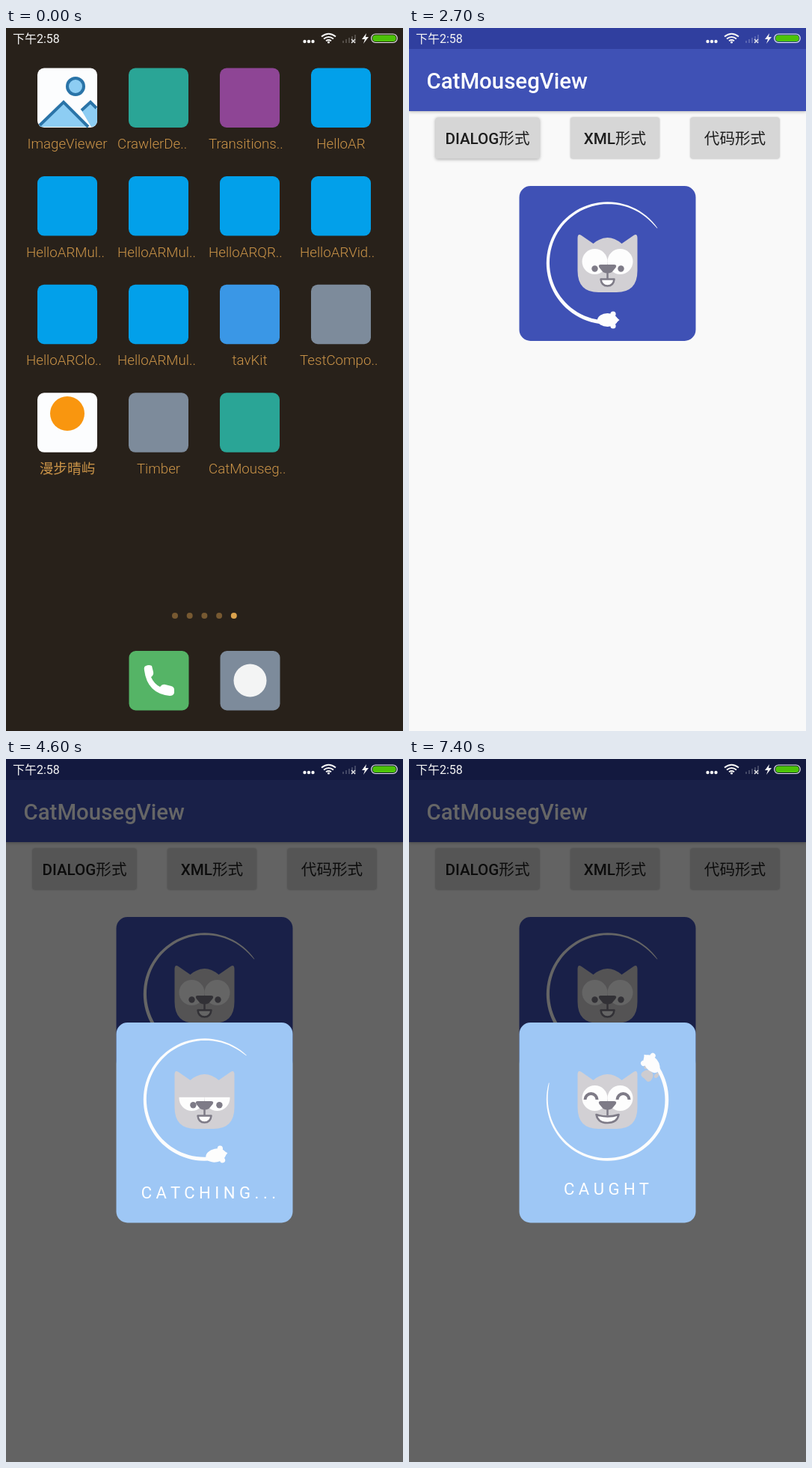
Animation of 531x939 px, one loop 8 s. Source, as an HTML page:

```html
<!DOCTYPE html>
<html lang="zh">
<head>
<meta charset="utf-8">
<title>CatMousegView</title>
<style>
  html, body { margin: 0; width: 100%; height: 100%; overflow: hidden; background: #28211a; }
  svg { display: block; width: 531px; height: 939px; }
  text { font-family: Roboto, "Noto Sans CJK SC", "Noto Sans CJK", sans-serif; white-space: pre; }
  .label { font-size: 18.7px; font-weight: 300; fill: #cb9448; text-anchor: middle; }
  .label.cut { text-anchor: start; }
  .button text { font-size: 20.6px; font-weight: 500; fill: #1d1d1d; text-anchor: middle; }
  .button .han { font-weight: 400; }
  .button rect { fill: #d6d6d6; filter: drop-shadow(0 .5px 1px #0004); }
  .button.pressed rect { filter: drop-shadow(0 1.5px 2px #0005); }
  .bar { filter: drop-shadow(0 1.5px 2px #0004); }
  .words { font-size: 22.1px; fill: #fff; }
</style>
</head>
<body>
<svg viewBox="0 0 531 939">
  <rect width="531" height="939" fill="#28211a"/>
  <g id="home"></g>
  <g id="app">
    <rect width="531" height="939" fill="#f9f9f9"/>
    <g id="content">
      <rect class="bar" y="28" width="531" height="83" fill="#3f51b5"/>
      <rect width="531" height="28" fill="#303f9f"/>
      <text x="23.5" y="81" font-size="29.4" font-weight="500" fill="#fff">CatMousegView</text>
      <g id="buttons"></g>
      <rect x="147.5" y="211" width="236" height="207" rx="15" fill="#3f51b5"/>
      <g id="idleCat" transform="translate(265.5 314)"></g>
    </g>
  </g>
  <rect id="dim" width="531" height="939"/>
  <g id="dialog">
    <rect x="147.5" y="352" width="236" height="267.5" rx="15" fill="#9ec7f5"/>
    <g id="chaseCat" transform="translate(265.5 455)"></g>
    <text id="typing" class="words" x="180.7" y="587"></text>
    <text id="caught" class="words" x="264" text-anchor="middle">C A U G H T</text>
  </g>
  <g id="status" fill="#f4f4f4">
    <text x="9" y="20" font-size="16">下午2:58</text>
    <circle cx="399.5" cy="18" r="2.2"/><circle cx="405" cy="18" r="2.2"/><circle cx="410.5" cy="18" r="2.2"/>
    <g fill="none" stroke="#f4f4f4" stroke-width="2">
      <path d="M422 11.500q9.500-7.500 19 0M425 14.500q6.500-5 13 0M428 17.300q3.500-2.500 7 0"/>
    </g>
    <circle cx="431.500" cy="19" r="1.600"/>
    <path d="M451 20v-3M455 20v-5M459 20v-7M463 20v-9M467 20v-11" stroke="#fff" stroke-opacity=".2" stroke-width="2"/>
    <path d="M462 15l5 5m0-5l-5 5" stroke="#eee" stroke-width="1.200"/>
    <path d="M482 7l-6 8h4l-2 6 7-9h-4z"/>
    <rect x="488.700" y="8" width="34.500" height="11.500" rx="5.500" fill="none" stroke="#eee" stroke-width="1.200"/>
    <rect x="490.300" y="9.600" width="31.300" height="8.300" rx="4" fill="#4cc308"/>
  </g>
</svg>
<script>
const LOOP = 8000, STEP = 100, TAIL = 235;
const CHASE_START = 2830, LAP = 1830, CAUGHT = 7200;
const $ = id => document.getElementById(id);

// Linear interpolation through [time, value] pairs.
function track(points, t) {
  if (t <= points[0][0]) return points[0][1];
  for (let i = 1; i < points.length; i++) {
    const [t0, v0] = points[i - 1], [t1, v1] = points[i];
    if (t <= t1) return v0 + (v1 - v0) * (t - t0) / (t1 - t0);
  }
  return points[points.length - 1][1];
}

const motion = {
  zoom: [[600, .12], [700, .4], [800, .7], [900, .89], [1000, .957], [1100, .985], [1300, 1]],
  window: [[500, 0], [600, .3], [700, .8], [800, 1]],
  content: [[900, 0], [1000, .2], [1100, .6], [1200, .92], [1300, 1]],
  home: [[500, 0], [1000, 1]],
  dim: [[2700, 0], [2800, .09], [2900, .32], [3000, .5], [3100, .6]],
  dialog: [[2700, 0], [2800, .4], [2900, 1]],
  angle: [[2850, 270], [2900, 279], [3600, 444], [5600, 839], [7100, 1119]],
  paw: [[5400, 0], [5500, 1], [5600, .9], [5800, 0], [6900, 0], [7000, 1]],
  caught: [[7100, 0], [7200, .45], [7300, .8], [7400, 1]]
};

function buildHome() {
  const blue = '#02a0ea', teal = '#2aa596', slate = '#7d8b9b';
  const apps = [
    ['ImageViewer', '#fcfdfe'], ['CrawlerDe..', teal], ['Transitions..', '#8e4595'], ['HelloAR', blue],
    ['HelloARMul..', blue], ['HelloARMul..', blue], ['HelloARQR..', blue], ['HelloARVid..', blue],
    ['HelloARClo..', blue], ['HelloARMul..', blue], ['tavKit', '#3a97e6'], ['TestCompo..', slate],
    ['漫步晴屿', '#fcfdfe'], ['Timber', slate], ['CatMouseg..', teal]
  ];
  const tile = (x, y, fill) => `<rect x="${x}" y="${y}" width="80" height="79.500" rx="9" fill="${fill}"/>`;
  let out = apps.map(([name, fill], i) => {
    const x = 42 + i % 4 * 122, y = 53.5 + Math.floor(i / 4) * 144.6;
    const cut = name.endsWith('..');
    return tile(x, y, fill) +
      `<text class="label${cut ? ' cut' : ''}" x="${cut ? x - 15 : x + 40}" y="${y + 107.5}">${name}</text>`;
  }).join('');
  out += `<circle cx="93" cy="78" r="11" fill="#8dcdf3" stroke="#2a74a8" stroke-width="4"/>
    <path d="M45 132L77 99l32 33zM101 110l12-11 9 9v16q-1 8-8 8z" fill="#8dcdf3"/>
    <path d="M45 130L77 99l33 33M101 110l12-11 8 8" fill="none" stroke="#2a74a8" stroke-width="4"/>
    <circle cx="82" cy="515" r="23" fill="#f9960f"/>`;
  for (let i = 0; i < 5; i++)
    out += `<circle cx="${226 + i * 19.7}" cy="785" r="4" fill="${i < 4 ? '#775931' : '#dba34d'}"/>`;
  out += tile(164.5, 832, '#55b466') + tile(286.5, 832, slate) +
    `<path d="M187 852q4-2 8 0l2 8q1 4-3 7 4 9 12 13 3-4 7-3l8 2q4 1 4 5v4q-1 4-6 4-30-3-34-34-1-5 2-6z" fill="#fff"/>
     <circle cx="326.500" cy="871.500" r="22" fill="#f3f4f4"/>`;
  $('home').innerHTML = out;
}

function buildButtons() {
  const items = [[35.5, 139, 'DIALOG', '形式'], [216, 119, 'XML', '形式'], [376.5, 119, '', '代码形式']];
  $('buttons').innerHTML = items.map(([x, w, latin, han]) => `<g class="button">
    <rect x="${x}" y="119.500" width="${w}" height="55" rx="3"/>
    <text x="${x + w / 2}" y="154.500">${latin}<tspan class="han">${han}</tspan></text></g>`).join('');
}

// Tapering arc trailing clockwise behind the mouse.
function tailPath() {
  const n = 60, outer = [], inner = [];
  for (let i = 0; i <= n; i++) {
    const u = i / n, a = u * TAIL * Math.PI / 180;
    const at = r => `${(r * Math.cos(a)).toFixed(2)} ${(r * Math.sin(a)).toFixed(2)}`;
    outer.push(at(81.7));
    inner.unshift(at(81 - 4.4 * Math.sqrt(1 - u)));
  }
  return `M${outer.concat(inner).join('L')}Z`;
}

function buildCat(host) {
  const dark = '#7e7b87', fur = '#d2d0d4';
  host.innerHTML = `
    <g class="paw" fill="#cdccd0">
      <path d="M-8 4q1-9 8-9t8 9q0 6-8 4-8 2-8-4z"/>
      <ellipse cx="-9" cy="-6" rx="2.500" ry="4"/><ellipse cx="-3.500" cy="-12" rx="2.600" ry="4.500"/>
      <ellipse cx="3.500" cy="-12" rx="2.600" ry="4.500"/><ellipse cx="9" cy="-6" rx="2.500" ry="4"/>
    </g>
    <g class="chase" fill="#fdfdfd">
      <path d="${tailPath()}"/>
      <g transform="translate(76 0)">
        <ellipse rx="9" ry="13.500"/><circle cx="-8" cy="-7.500" r="3.600"/><circle cx="8" cy="-7.500" r="3.600"/>
        <path d="M-6-9L0-16 6-9z"/>
      </g>
    </g>
    <path d="M-40-33Q-40-40-35-37L-19-26Q0-42 19-26L35-37Q40-40 40-33V10Q40 39 12 39H-12Q-40 39-40 10Z" fill="${fur}"/>
    <circle cx="-17" cy="-2" r="17" fill="#fdfdfd"/><circle cx="17" cy="-2" r="17" fill="#fdfdfd"/>
    <g class="awake">
      <g class="pupils" fill="${dark}"><circle cx="-17" cy="-2" r="4.200"/><circle cx="18" cy="-2" r="4.200"/></g>
      <rect class="lid" x="-36" y="-20" width="72" fill="${fur}"/>
      <path d="M-9 21.500H9Q8 30.500 0 30.500T-9 21.500Z" fill="#fdfdfd" stroke="${dark}" stroke-width="2.500" stroke-linejoin="round"/>
    </g>
    <g class="happy" stroke="${dark}" stroke-width="4" fill="none">
      <path d="M-30 0a8 8 0 0 1 16 0M13 0a8 8 0 0 1 16 0"/>
      <path d="M-15 20Q0 25 15 20 13 31 0 31T-15 20Z" fill="#fdfdfd" stroke-width="2.500" stroke-linejoin="round"/>
    </g>
    <path d="M0 10V21" stroke="${dark}" stroke-width="2.500"/>
    <path d="M-9 2H9Q13 2 11 6L6 12Q0 15-6 12L-11 6Q-13 2-9 2Z" fill="${dark}"/>`;
  const part = name => host.querySelector('.' + name);
  const [chase, pupils, lid, paw, awake, happy] = ['chase', 'pupils', 'lid', 'paw', 'awake', 'happy'].map(part);
  return (angle, cover = 0, pawAlpha = 0, smiling = false) => {
    const a = angle * Math.PI / 180;
    chase.setAttribute('transform', `rotate(${-angle})`);
    pupils.setAttribute('transform', `translate(${9.5 * Math.cos(a)} ${-9.5 * Math.sin(a)})`);
    lid.setAttribute('height', 34 * cover);
    paw.setAttribute('opacity', pawAlpha);
    paw.setAttribute('transform', `translate(${smiling ? '55 -34' : '63 -38'}) rotate(42)`);
    awake.setAttribute('display', smiling ? 'none' : 'inline');
    happy.setAttribute('display', smiling ? 'inline' : 'none');
  };
}

buildHome();
buildButtons();
const poseIdle = buildCat($('idleCat'));
const poseChase = buildCat($('chaseCat'));
poseIdle(270);

function draw(t) {
  const at = name => track(motion[name], t);
  const fade = (id, value) => $(id).setAttribute('opacity', value);
  const scaleAbout = (id, x, y, s) =>
    $(id).setAttribute('transform', `translate(${x * (1 - s)} ${y * (1 - s)}) scale(${s})`);

  const away = at('home');
  scaleAbout('home', 265.5, 469.5, 1 + .5 * away);
  fade('home', 1 - .96 * away);
  scaleAbout('app', 345, 578, at('zoom'));
  fade('app', at('window'));
  fade('content', at('content'));
  $('buttons').firstElementChild.classList.toggle('pressed', t >= 2700 && t < 2900);
  fade('dim', at('dim'));
  fade('dialog', at('dialog'));

  const done = t >= CAUGHT;
  const phase = Math.max(0, t - CHASE_START) / LAP % 1;
  poseChase(at('angle'), .5 * Math.cos(Math.PI * phase) ** 2, at('paw'), done);
  const count = Math.floor(phase * 12);
  $('typing').textContent = done ? '' : [...'CATCHING...'].slice(0, count).join(' ');
  fade('caught', at('caught'));
  $('caught').setAttribute('y', 587 - 5 * at('caught'));
}

const start = performance.now();
function tick() {
  const t = (performance.now() - start) % LOOP;
  draw(Math.floor(t / STEP) * STEP);
  requestAnimationFrame(tick);
}
tick();
</script>
</body>
</html>
```
